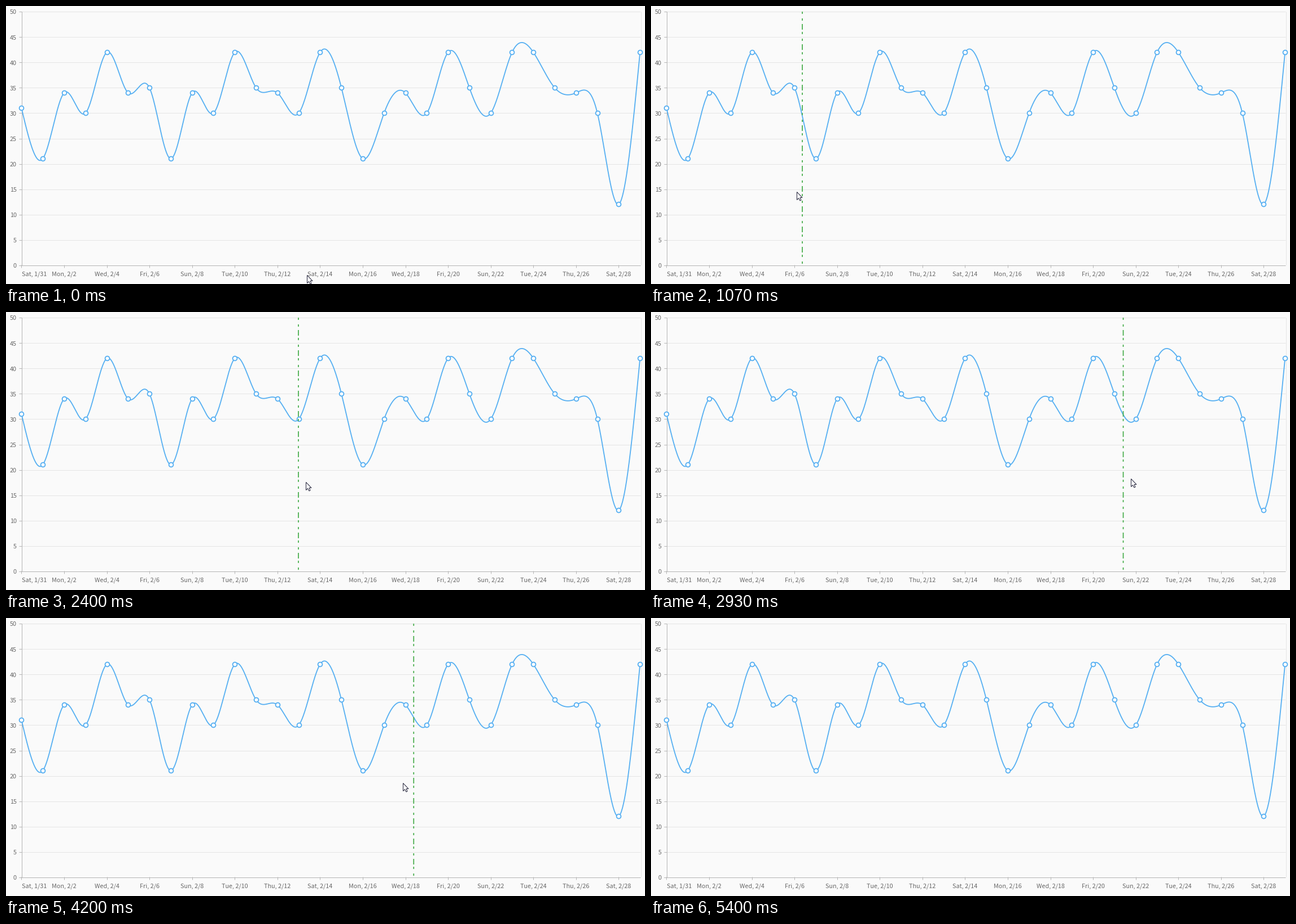
Recreate the animation shown at these times as a matplotlib script. Size 1132 by 494 pixels, loop 5670 ms.

```python
import numpy as np
import matplotlib.pyplot as plt
from matplotlib.animation import FuncAnimation
from matplotlib.patches import Polygon

W, H, DPI = 1132, 494, 100
PX = 72 / DPI                      # one pixel in points
LEFT, RIGHT, TOP, BOTTOM = 27.4, 1123.2, 10.4, 460.2

LOOP, INTERVAL = 5670, 30
STEP_MS, LAST_STEP = 200 / 3, 81
LAG = 0.36                         # the line trails the pointer, in steps

BACK, GRID, AXIS = "#fafafa", "#e5e5e5", "#b5b5b5"
TEXT, BLUE, GREEN, DARK = "#686868", "#55aff2", "#4caf50", "#23233a"

VALUES = np.array([31, 21, 34, 30, 42, 34, 35, 21, 34, 30,
                   42, 35, 34, 30, 42, 35, 21, 30, 34, 30,
                   42, 35, 30, 42, 42, 35, 34, 30, 12, 42], float)
WEEKDAYS = ["Sat", "Sun", "Mon", "Tue", "Wed", "Thu", "Fri"]

# turning points of the pointer: step, x, y
STEPS, XS, YS = np.array([
    (0, 533, 478), (9, 463, 420), (16, 258, 330), (23, 102, 306),
    (27, 181, 306), (36, 531, 302), (52, 1060, 290), (56, 1075, 289),
    (63, 703, 293), (72, 291, 335), (79, 73, 485)], float).T

ARROW = np.array([(0.5, 0.5), (0.5, 14.5), (3.5, 11.5), (6, 16),
                  (8, 15), (6, 10.5), (10, 10.5)])


def hermite(xs, ys, slopes, q):
    i = np.clip(np.searchsorted(xs, q, side="right") - 1, 0, len(xs) - 2)
    h = xs[i + 1] - xs[i]
    t = (q - xs[i]) / h
    return ((1 + 2 * t) * (1 - t) ** 2 * ys[i]
            + t * (1 - t) ** 2 * h * slopes[i]
            + t * t * (3 - 2 * t) * ys[i + 1]
            + t * t * (t - 1) * h * slopes[i + 1])


def natural_slopes(ys):
    """Slopes of the natural cubic spline over evenly spaced points."""
    n = len(ys)
    m = 4 * np.eye(n) + np.eye(n, k=1) + np.eye(n, k=-1)
    m[0, 0] = m[-1, -1] = 2
    padded = np.pad(ys, 1, mode="edge")
    return np.linalg.solve(m, 3 * (padded[2:] - padded[:-2]))


def glide(keys, step):
    return hermite(STEPS, keys, np.gradient(keys, STEPS), step)


def x_pos(day):
    return LEFT + (RIGHT - LEFT) * day / (len(VALUES) - 1)


def y_pos(value):
    return BOTTOM - (BOTTOM - TOP) * value / 50


fig = plt.figure(figsize=(W / DPI, H / DPI), dpi=DPI, facecolor=BACK)
ax = fig.add_axes([0, 0, 1, 1])
ax.set_xlim(0, W)
ax.set_ylim(H, 0)
ax.axis("off")


def rule(xs, ys, color, z=1):
    ax.plot(xs, ys, color=color, lw=PX, zorder=z, solid_capstyle="butt")


def label(x, y, text, align):
    ax.text(x, y, text, ha=align, va="baseline", color=TEXT, zorder=3,
            fontsize=10.8 * PX, family=["Noto Sans CJK JP", "Liberation Sans"])


def draw_axes():
    for value in range(0, 51, 5):
        y = 460.5 - 9 * value
        if value:
            rule([28, 1124], [y, y], GRID)
        rule([23, 28], [y, y], AXIS, 2)
        label(18.7, y + 4, str(value), "right")
    rule([1124.5, 1124.5], [10, 460], GRID)
    rule([27.5, 27.5], [10, 461], AXIS, 2)
    rule([23, 1124], [460.5, 460.5], AXIS, 2)
    for day in range(0, len(VALUES), 2):
        x = x_pos(day)
        rule([x, x], [460, 465], AXIS, 2)
        date = f"2/{day}" if day else "1/31"
        label(x if day else 28, 479, f"{WEEKDAYS[day % 7]}, {date}",
              "center" if day else "left")


def draw_series():
    days = np.arange(len(VALUES), dtype=float)
    fine = np.linspace(0, days[-1], 1200)
    curve = hermite(days, VALUES, natural_slopes(VALUES), fine)
    ax.plot(x_pos(fine), y_pos(curve), color=BLUE, lw=1.8 * PX, zorder=4)
    ax.plot(x_pos(days), y_pos(VALUES), "o", ms=7.8 * PX, mfc="white",
            mec=BLUE, mew=1.8 * PX, zorder=5, snap=False)


draw_axes()
draw_series()
# dash lengths count in line widths
width = 1.8
dashes = [d / width for d in (4, 8, 4, 6, 10, 4)]
tracker, = ax.plot([0, 0], [10, 460], color=GREEN, lw=width * PX, zorder=6,
                   ls=(0, dashes), dash_capstyle="butt", snap=False)
pointer = Polygon(ARROW, closed=True, fc="white", ec=DARK, lw=PX,
                  joinstyle="miter", zorder=7)
ax.add_patch(pointer)


def update(frame):
    step = min(int((frame * INTERVAL + 24) / STEP_MS), LAST_STEP)
    x, y = glide(XS, step), glide(YS, step)
    line_x = glide(XS, max(step - LAG, 0)) + 0.5
    pointer.set_xy(ARROW + (round(x), round(y)))
    pointer.set_visible(step < LAST_STEP)
    tracker.set_xdata([line_x, line_x])
    tracker.set_visible(bool(y < BOTTOM) and step < LAST_STEP)
    return tracker, pointer


anim = FuncAnimation(fig, update, frames=LOOP // INTERVAL, interval=INTERVAL,
                     repeat=True, repeat_delay=0, blit=False)
plt.show()
```
